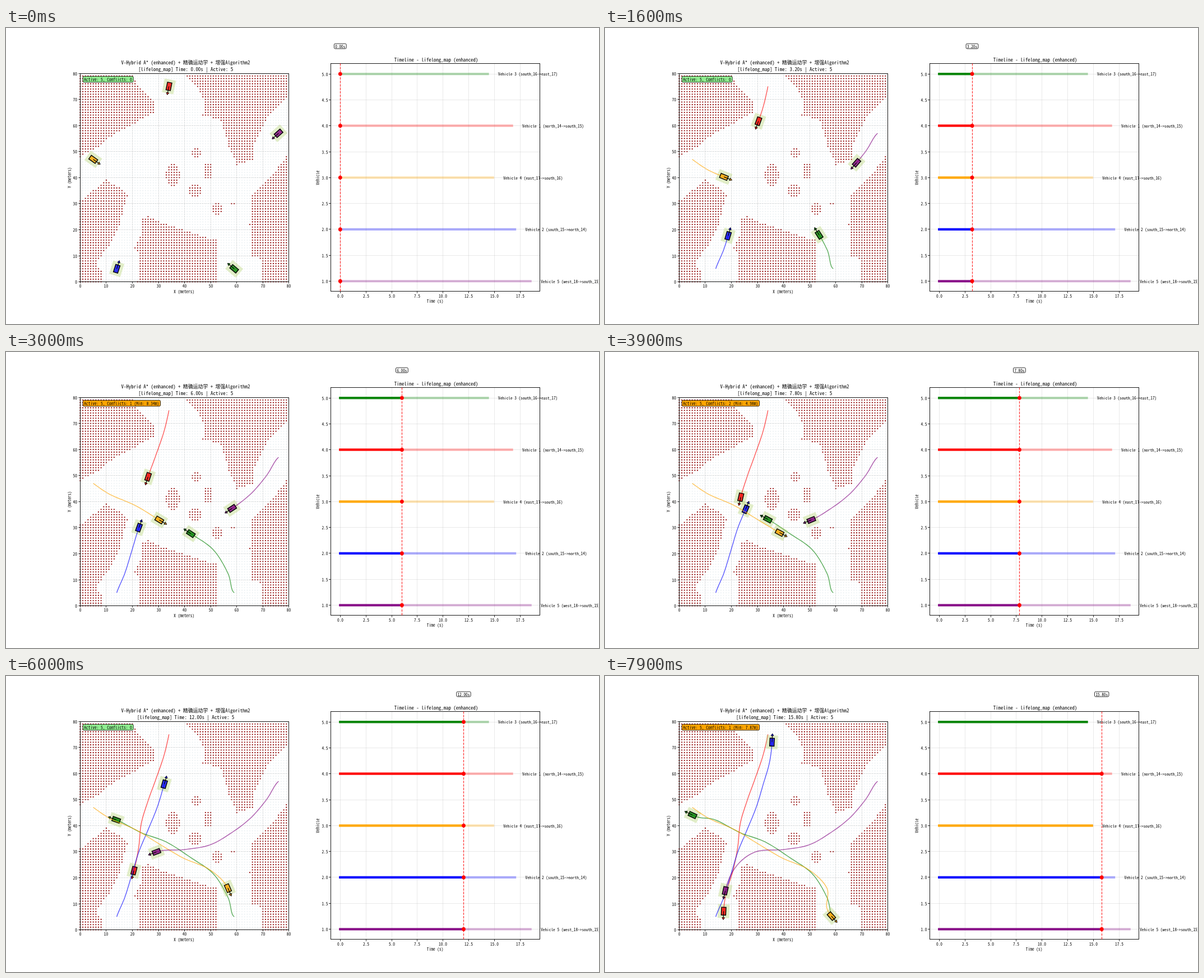
Recreate the animation shown at these times as an HTML page with a canvas. Size 1058 by 529 pixels, loop 8000 ms.

```html
<!DOCTYPE html>
<html>
<head>
<meta charset="utf-8">
<style>
html, body { margin: 0; width: 100%; height: 100%; overflow: hidden; background: #fff; }
canvas { display: block; }
</style>
</head>
<body>
<canvas id="stage" width="1058" height="529"></canvas>
<script>
const W = 1058, H = 529, M = 4.656; // M: pixels per metre on the map
const view = document.getElementById('stage').getContext('2d');
const backdrop = document.createElement('canvas');
backdrop.width = W;
backdrop.height = H;
let g = view;

const mapX = x => 132.4 + x * M, mapY = y => 453.6 - y * M;
const timeX = s => 596.3 + s * 18.35, rowY = r => 545.1 - r * 92.6;
const crisp = v => Math.floor(v) + .5;

// Blocked ground in metres: outlines of the large areas, ellipses for the islands
const areas = [
  'M0 79 20 79 22 75 28 69 28 65 21 61 12 56 7 52 0 48Z',
  'M41 79 45 75 48 69 47 64 54 62 57 52 60 45 66 47 67 54 72 64 79 71 79 79Z',
  'M79 48 72 39 66 33 65 22 66 10 69 9 70 0 79 0Z',
  'M0 31 10 39 15 36 18 33 15 22 11 14 6 7 8 4 8 0 0 0Z',
  'M26 25 24 24 24 20 21 13 23 10 22 0 52 0 52 16 30 23Z'
].map(d => new Path2D(d));
const islands = [[35.4, 41, 2.7, 4.2], [44.6, 49.5, 1.8, 1.8], [49, 42.5, 2, 2.9],
  [44, 35, 2.6, 2.4], [52.3, 28, 2, 2.2], [58.6, 30, .8, 1.1]];

// One way point every two seconds, in metres; the first lies before the start
const cars = [
  { id: 1, color: '#ff0000', row: 4, stop: 16.7, route: 'north_14->south_15',
    xs: [35.1, 34, 32.1, 29.1, 26, 23.4, 22.4, 20.6, 18, 17],
    ys: [81.9, 75, 66.9, 58.1, 49.5, 40.8, 31.6, 22.7, 14.2, 6.4] },
  { id: 2, color: '#0000ff', row: 2, stop: 17, route: 'south_15->north_14',
    xs: [12.7, 14, 17.1, 19.8, 22.5, 25.8, 29.5, 32.2, 34.6, 35.6],
    ys: [-1.5, 5, 12.5, 21.2, 30, 37.9, 47, 55.9, 64.3, 72.9] },
  { id: 3, color: '#008000', row: 5, stop: 14.35, route: 'south_16->east_17',
    xs: [65.6, 59, 56.6, 51, 42.4, 33, 23.3, 13.8, 6.4, -1],
    ys: [5.5, 5, 12.5, 21.5, 27.7, 33.7, 37.3, 42.2, 43.5, 48] },
  { id: 4, color: '#ffa500', row: 3, stop: 14.85, route: 'east_17->south_16',
    xs: [.5, 5, 11.5, 21.1, 30.3, 39.4, 49.6, 56.6, 56.7, 62],
    ys: [50.5, 47, 42.7, 38.5, 32.95, 27.6, 23.1, 16, 7.9, 2.5] },
  { id: 5, color: '#800080', row: 1, stop: 18.5, route: 'west_18->south_15',
    xs: [81.9, 76, 71.4, 65.4, 58.2, 49.7, 39.9, 29.2, 21.5, 17.4],
    ys: [59, 57, 50, 43, 37.4, 32.6, 30.8, 29.9, 23.9, 13.8] }
];

function slope(p, i) {
  return i < p.length - 1 ? (p[i + 1] - p[i - 1]) / 2 : 2 * (p[i] - p[i - 1]) - slope(p, i - 1);
}

// Smooth curve through evenly timed points
function curve(p, t) {
  const i = 1 + Math.floor(t / 2), u = t / 2 + 1 - i, v = 1 - u;
  return v * v * (1 + 2 * u) * p[i] + u * u * (1 + 2 * v) * p[i + 1] +
    u * v * (v * slope(p, i) - u * slope(p, i + 1));
}

const place = (car, t) => [mapX(curve(car.xs, t)), mapY(curve(car.ys, t))];

function heading(car, t) {
  const [a, b] = place(car, t), [c, d] = place(car, t + .05);
  return Math.atan2(d - b, c - a);
}

// Half-width Latin beside full-width Han characters
const LATIN = '"Noto Sans Mono CJK SC", "Noto Sans Mono", monospace';
const HAN = '"Noto Sans CJK SC", "Noto Sans CJK", sans-serif';
g.font = '100px ' + LATIN;
const ratio = g.measureText('0').width / 100;

function text(str, x, y, step = 3.7, align = .5) {
  const runs = str.match(/[\u4e00-\u9fff]+|[^\u4e00-\u9fff]+/g).map(s => {
    const han = s >= '\u4e00';
    return [s, han ? `${step * 2}px ${HAN}` : `${step / ratio}px ${LATIN}`, s.length * step * (han ? 2 : 1)];
  });
  x -= align * runs.reduce((sum, r) => sum + r[2], 0);
  g.fillStyle = '#000';
  g.textBaseline = 'middle';
  for (const [s, font, width] of runs) {
    g.font = font;
    g.fillText(s, x, y);
    x += width;
  }
}

function upright(str, x, y) {
  g.save();
  g.translate(x, y);
  g.rotate(-Math.PI / 2);
  text(str, 0, 0);
  g.restore();
}

function line(x1, y1, x2, y2, color, width = .8, dash = []) {
  g.strokeStyle = color;
  g.lineWidth = width;
  g.setLineDash(dash);
  g.beginPath();
  g.moveTo(x1, y1);
  g.lineTo(x2, y2);
  g.stroke();
  g.setLineDash([]);
}

function disc(x, y, r, color) {
  g.fillStyle = color;
  g.beginPath();
  g.arc(x, y, r, 0, 7);
  g.fill();
}

function box(x, y, w, h, fill) {
  g.beginPath();
  g.roundRect(x, y, w, h, 2);
  g.fillStyle = fill;
  g.fill();
  g.strokeStyle = '#000';
  g.lineWidth = .8;
  g.stroke();
}

function frame(left, top, right, bottom) {
  g.strokeStyle = '#000';
  g.lineWidth = .9;
  g.strokeRect(left, top, right - left, bottom - top);
}

function bar(car, right, alpha) {
  g.globalAlpha = alpha;
  line(timeX(0) - 2.2, rowY(car.row), right, rowY(car.row), car.color, 4.2);
  g.globalAlpha = 1;
}

const barEnd = car => timeX(car.stop) + 2;

function blocked(x, y) {
  return areas.some(a => g.isPointInPath(a, x, y)) ||
    islands.some(([cx, cy, rx, ry]) => Math.hypot((x - cx) / rx, (y - cy) / ry) <= 1);
}

function drawMap() {
  for (let x = 0; x < 80; x++)
    for (let y = 0; y < 80; y++) {
      if (blocked(x, y)) disc(mapX(x), mapY(y), 1.15, '#951010');
      else disc(mapX(x), mapY(y), .85, 'rgba(175,195,205,.32)');
    }
  for (let v = 0; v <= 80; v += 10) {
    const x = crisp(mapX(v)), y = crisp(mapY(v));
    line(x, mapY(0), x, mapY(80), 'rgba(150,150,150,.45)', .7, [2.4, 1.1]);
    line(mapX(0), y, mapX(80), y, 'rgba(150,150,150,.45)', .7, [2.4, 1.1]);
    line(x, mapY(0), x, mapY(0) + 3, '#000');
    line(mapX(0) - 3, y, mapX(0), y, '#000');
    text(String(v), x, 461.5);
    text(String(v), 127, y + .5, 3.7, 1);
  }
  frame(crisp(mapX(0)), crisp(mapY(80)), crisp(mapX(80)), crisp(mapY(0)));
  text('X (meters)', 317.7, 471);
  upright('Y (meters)', 113, 267.5);
  text('V-Hybrid A* (enhanced) + 精确运动学 + 增强Algorithm2', 320.5, 62, 4.42);
}

function drawTimeline() {
  const left = 579.5, top = 63.5, right = 952.5, bottom = 470.5;
  for (let s = 0; s < 18; s += 2.5) {
    const x = crisp(timeX(s));
    line(x, top, x, bottom, 'rgba(176,176,176,.35)');
    line(x, bottom, x, bottom + 3.5, '#000');
    text(s.toFixed(1), x, 479);
  }
  for (let r = 1; r <= 5; r += .5) {
    const y = crisp(rowY(r));
    line(left, y, right, y, 'rgba(176,176,176,.35)');
    line(left - 3.5, y, left, y, '#000');
    text(r.toFixed(1), 574.5, y + .5, 3.7, 1);
  }
  for (const car of cars) bar(car, barEnd(car), .31);
  frame(left, top, right, bottom);
  for (const car of cars)
    text(`Vehicle ${car.id} (${car.route})`, timeX(car.stop + 1), rowY(car.row) + .5, 3.67, 0);
  text('Time (s)', 765.6, 488.5);
  upright('Vehicle', 556.5, 267.5);
  text('Timeline - lifelong_map (enhanced)', 767.5, 56.5, 4.4);
}

function drawCar(car, time) {
  const t = Math.min(time, car.stop), [x, y] = place(car, t);
  const posed = paint => {
    g.save();
    g.translate(x, y);
    g.rotate(heading(car, t));
    paint();
    g.restore();
  };
  posed(() => {
    g.fillStyle = 'rgba(180,210,110,.38)';
    g.fillRect(-12.3, -10.3, 24.6, 20.6);
  });
  g.globalAlpha = .65;
  g.strokeStyle = car.color;
  g.lineWidth = 1.4;
  g.lineJoin = 'round';
  g.beginPath();
  for (let s = 0; s < t; s += .2) g.lineTo(...place(car, s));
  g.lineTo(x, y);
  g.stroke();
  g.globalAlpha = 1;
  posed(() => {
    g.globalAlpha = .8;
    g.fillStyle = car.color;
    g.fillRect(-7, -4, 14, 8);
    g.globalAlpha = 1;
    g.strokeStyle = '#000';
    g.lineWidth = 1.4;
    g.lineJoin = 'miter';
    g.strokeRect(-7, -4, 14, 8);
    line(0, 0, 11.5, 0, '#000', 1.2);
    g.beginPath();
    g.moveTo(15.3, 0);
    g.lineTo(11.5, -2.3);
    g.lineTo(11.5, 2.3);
    g.closePath();
    g.fillStyle = car.color;
    g.fill();
    g.lineWidth = .9;
    g.stroke();
  });
}

function drawStatus(t) {
  const spots = cars.map(car => place(car, Math.min(t, car.stop)));
  const near = spots.flatMap(([ax, ay], i) =>
    spots.slice(i + 1).map(([bx, by]) => Math.hypot(ax - bx, ay - by) / M)).filter(gap => gap < 9);
  let label = `Active: 5, Conflicts: ${near.length}`;
  if (near.length) label += ` (Min: ${Math.min(...near).toFixed(2)}m)`;
  box(137.2, 86.3, label.length * 3.72 + 4.4, 10.6, near.length ? '#ffa500' : '#90ee90');
  text(label, 139.3, 91.8, 3.72, 0);
}

function drawProgress(t) {
  const x = timeX(t);
  if (t > 0) for (const car of cars) bar(car, t > car.stop ? barEnd(car) : x - 2.6, .92);
  line(crisp(x), 470.5, crisp(x), 63.5, 'rgba(255,0,0,.8)', 1.2, [4.3, 1.9]);
  for (const car of cars) if (t <= car.stop) disc(x, rowY(car.row), 3.4, '#ff0000');
  const label = t.toFixed(2) + 's', w = label.length * 3.6 + 3.8;
  box(x - w / 2, 28, w, 9, '#fff');
  text(label, x, 32.8, 3.6);
}

function draw(now) {
  const t = Math.floor(now % 8000 / 100) / 5;
  g.clearRect(0, 0, W, H);
  g.drawImage(backdrop, 0, 0);
  text(`[lifelong_map] Time: ${t.toFixed(2)}s | Active: 5`, 320.7, 73.5, 4.45);
  for (const car of cars) drawCar(car, t);
  drawStatus(t);
  drawProgress(t);
  requestAnimationFrame(draw);
}

g = backdrop.getContext('2d');
drawMap();
drawTimeline();
g = view;
requestAnimationFrame(draw);
</script>
</body>
</html>
```
